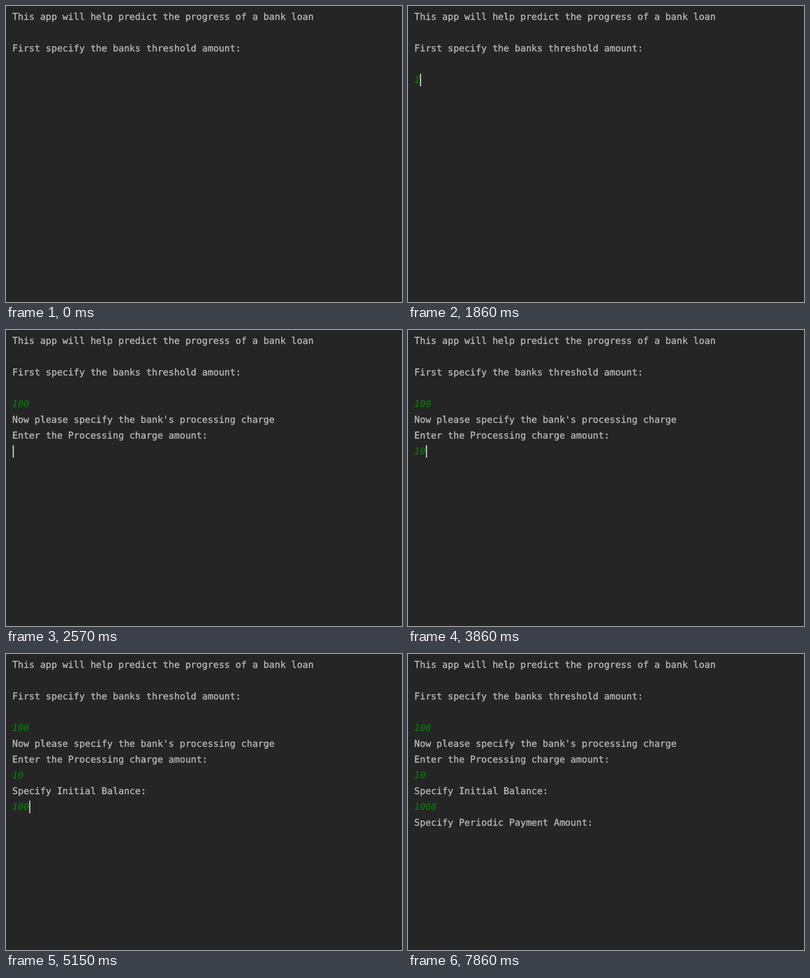
Animation of 600 by 450 pixels, one loop 8 s. Source, as an HTML page:

```html
<!DOCTYPE html>
<html lang="en">
<head>
<meta charset="utf-8">
<style>
  html, body { margin: 0; width: 100%; height: 100%; overflow: hidden; background: #252526; }
  #console {
    position: absolute; left: 9.5px; top: 5px; margin: 0;
    font: 14.06px/24px "DejaVu Sans Mono", monospace;
    text-rendering: geometricPrecision; color: #bbb;
    -webkit-text-stroke: 0.3px;
  }
  #console div { height: 24px; white-space: pre; }
  #console .typed { color: #078407; font-style: italic; -webkit-text-stroke: 0; }
  #caret { position: absolute; width: 2px; height: 19px; background: #b5b5b5; }
</style>
</head>
<body>
<div id="console"></div>
<div id="caret"></div>
<script>
const LOOP = 8000, ROW = 24, COLUMN = 8.47;

// Printed lines: [time, row, text]
const output = [
  [0, 0, "This app will help predict the progress of a bank loan"],
  [0, 2, "First specify the banks threshold amount:"],
  [2570, 5, "Now please specify the bank's processing charge"],
  [2570, 6, "Enter the Processing charge amount:"],
  [4430, 8, "Specify Initial Balance:"],
  [5860, 10, "Specify Periodic Payment Amount:"]
];

// Typed lines: row, text, time of each key, time of Enter, time of the next prompt
const input = [
  { row: 4, text: "100", keys: [1860, 2000, 2140], enter: 2290, prompt: 2570 },
  { row: 7, text: "10", keys: [3570, 3860], enter: 4150, prompt: 4430 },
  { row: 9, text: "1000", keys: [4860, 5000, 5150, 5430], enter: 5570, prompt: 5860 }
];
const lastRow = 11;

// Spans in which the blinking caret is dark
const dark = [[0, 290], [860, 1290], [3290, 3570], [6860, 7290], [7860, LOOP]];

const terminal = document.getElementById("console");
const caret = document.getElementById("caret");
const rows = Array.from({ length: lastRow + 1 }, () =>
  terminal.appendChild(document.createElement("div")));
for (const { row } of input) rows[row].className = "typed";

const typedCount = (line, t) => line.keys.filter(key => key <= t).length;

function caretCell(t) {
  const line = input.find(item => t < item.prompt);
  if (!line) return [lastRow, 0];
  return t < line.enter ? [line.row, typedCount(line, t)] : [line.row + 1, 0];
}

function draw(t) {
  for (const [time, row, text] of output) rows[row].textContent = t >= time ? text : "";
  for (const line of input) {
    rows[line.row].textContent = line.text.slice(0, typedCount(line, t));
  }
  const [row, column] = caretCell(t);
  caret.style.left = 9.7 + column * COLUMN + "px";
  caret.style.top = 6.5 + row * ROW + "px";
  caret.hidden = dark.some(([from, to]) => t >= from && t < to);
}

function tick() {
  draw(performance.now() % LOOP);
  requestAnimationFrame(tick);
}
tick();
</script>
</body>
</html>
```
